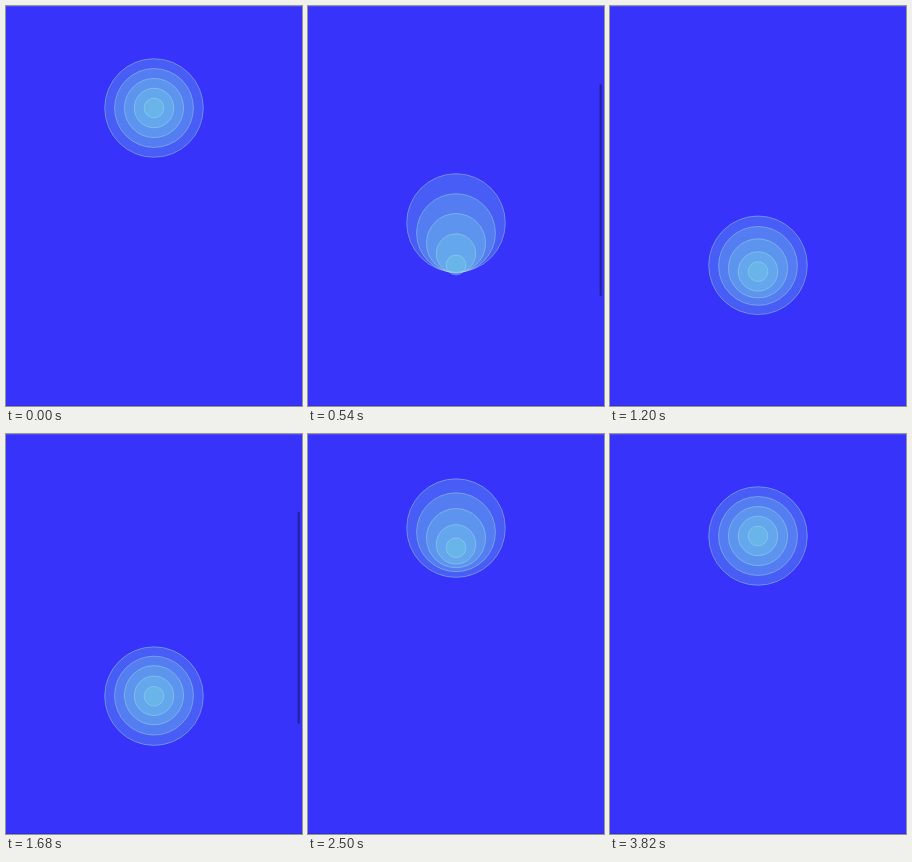
Recreate the animation shown at these times as an HTML page. Size 296 px wide and 400 px high, loop 3920 ms.

```html
<!DOCTYPE html>
<html lang="en">
<head>
<meta charset="utf-8">
<title>Springy circles</title>
<style>
  html, body { margin: 0; width: 100%; height: 100%; overflow: hidden; background: #3833fb; }
  svg { display: block; width: 296px; height: 400px; }
  circle { fill: rgba(120, 220, 225, .25); stroke: rgba(175, 225, 240, .5); stroke-width: .8; }
</style>
</head>
<body>
<svg id="stage" viewBox="0 0 296 400">
  <rect width="296" height="1" fill="#fff" opacity=".1"/>
  <rect y="399" width="296" height="1" opacity=".12"/>
  <rect id="bar" x="291.6" width="2.2" height="212" rx="1.1"/>
</svg>
<script>
const LOOP = 3.92, DOWN_AT = 0.04, UP_AT = 1.63;
const TOP = 102, TRAVEL = 160, RADIUS = 49.3, COUNT = 5;
const BAR_TOP = 71, BAR_TRAVEL = 215, DRAG = 0.5125;
const LIFT = 0.03, RELEASE = 0.45;

const stage = document.getElementById('stage');
const bar = document.getElementById('bar');
const clamp = v => Math.min(1, Math.max(0, v));

// Smaller circles have stiffer springs and arrive earlier.
const circles = Array.from({ length: COUNT }, (_, i) => {
  const el = document.createElementNS('http://www.w3.org/2000/svg', 'circle');
  el.setAttribute('cx', 148);
  el.setAttribute('r', RADIUS * (1 - i / COUNT));
  stage.insertBefore(el, bar);
  return { el, move: makeMove(8.5 * 1.112 ** i, 4.7 - 0.35 * i, 0.6 - 0.0233 * i, 0.237 + 0.002 * i) };
});

// Power-curve pull up to the release, then a damped oscillation around 1.
function makeMove(omega, decay, cross, amp) {
  const swing = t => 1 + amp * Math.exp(-decay * (t - cross)) * Math.sin(omega * (t - cross));
  const start = swing(RELEASE);
  const slope = (swing(RELEASE + 1e-4) - start) / 1e-4;
  const span = RELEASE - LIFT;
  const power = span * slope / start;
  return t => t >= RELEASE ? swing(t) : start * Math.max(0, (t - LIFT) / span) ** power;
}

const drag = t => clamp(t / DRAG) ** 1.5;
const barAlpha = t => t < 0.019 ? 0 : clamp((0.84 - t) / 0.24);

function draw(now) {
  const t = (now / 1000) % LOOP;
  const down = t - DOWN_AT, up = t - UP_AT;
  for (const { el, move } of circles) {
    el.setAttribute('cy', TOP + TRAVEL * (move(down) - move(up)));
  }
  bar.setAttribute('y', BAR_TOP + BAR_TRAVEL * (1 - drag(down) + drag(up)));
  bar.setAttribute('opacity', 0.35 * Math.max(barAlpha(down), barAlpha(up)));
}

const began = performance.now();
function tick() {
  draw(performance.now() - began);
  requestAnimationFrame(tick);
}
tick();
</script>
</body>
</html>
```
